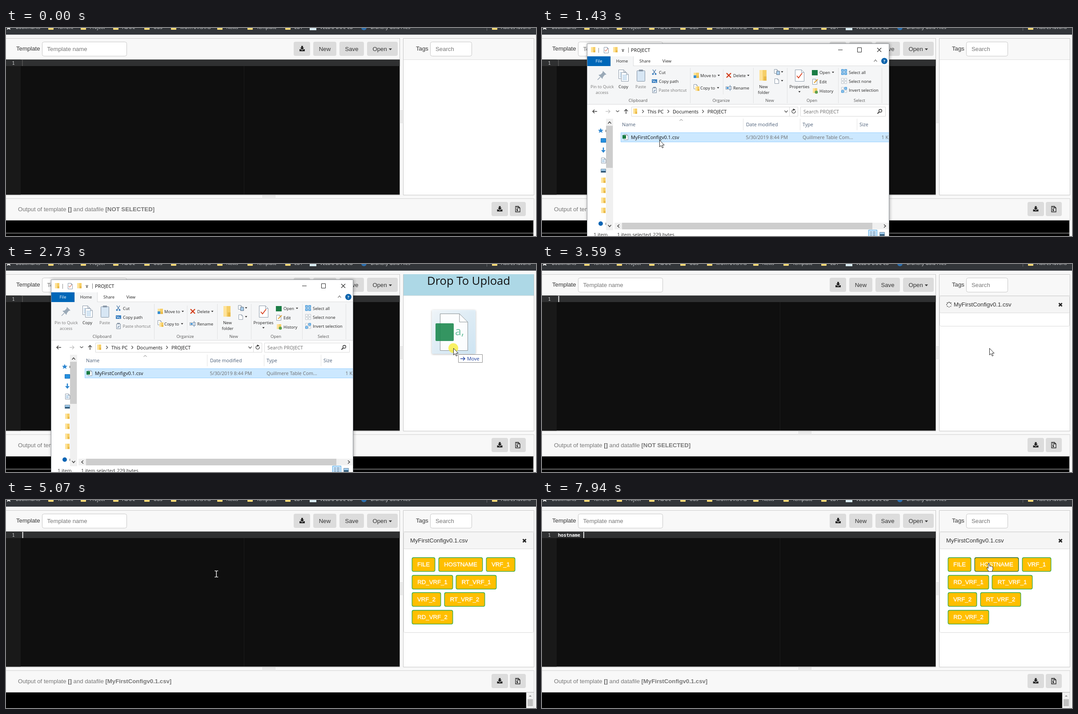
An HTML page with a canvas for the animation above (8 s loop, 1192x470 px).

```html
<!DOCTYPE html>
<html lang="en">
<head>
<meta charset="utf-8">
<title>Template editor</title>
<style>
html, body { margin: 0; width: 100%; height: 100%; overflow: hidden; background: #f8f8f8; }
canvas { display: block; }
</style>
</head>
<body>
<canvas id="stage" width="1192" height="470"></canvas>
<script>
const LOOP = 8000;
const WEB = '13.2px "Liberation Sans", Arial, sans-serif';
const UI = '10.8px "Open Sans", sans-serif';
const RIBBON = '9.4px "Open Sans", sans-serif';
const MONO = 'bold 10.4px "Noto Sans Mono", monospace';
const FILE = 'MyFirstConfigv0.1.csv';

const stage = document.getElementById('stage').getContext('2d');
let c = stage;

// ---------- drawing helpers ----------
function box(x, y, w, h, fill, stroke, r = 0) {
  const o = stroke ? 0.5 : 0;
  c.beginPath();
  c.roundRect(x + o, y + o, w - 2 * o, h - 2 * o, r);
  if (fill) { c.fillStyle = fill; c.fill(); }
  if (stroke) { c.strokeStyle = stroke; c.lineWidth = 1; c.stroke(); }
}
function text(s, x, y, font = UI, color = '#111', align = 'left') {
  c.font = font;
  c.fillStyle = color;
  c.textAlign = align;
  c.fillText(s, x, y);
  return x + c.measureText(s).width;
}
function trace(pts, x = 0, y = 0) {
  c.beginPath();
  for (let i = 0; i < pts.length; i += 2) c.lineTo(x + pts[i], y + pts[i + 1]);
}
function line(color, width, ...pts) {
  trace(pts);
  c.strokeStyle = color;
  c.lineWidth = width;
  c.stroke();
}
function poly(color, ...pts) {
  trace(pts);
  c.fillStyle = color;
  c.fill();
}
function disc(x, y, r, color) {
  c.beginPath();
  c.arc(x, y, r, 0, 7);
  c.fillStyle = color;
  c.fill();
}
const hline = (x1, x2, y, color) => box(x1, y, x2 - x1, 1, color);
const vline = (x, y1, y2, color) => box(x, y1, 1, y2 - y1, color);
const caret = (x, y, r = 2.5, color = '#222') => poly(color, x - r, y - r / 2, x + r, y - r / 2, x, y + r / 2 + 0.5);
function chevron(x, y, dx, dy, color = '#444', width = 1.2) {
  if (dx) line(color, width, x - dx, y - 3.5, x + dx, y, x - dx, y + 3.5);
  else line(color, width, x - 3.5, y - dy, x, y + dy, x + 3.5, y - dy);
}
function folder(x, y, w = 10, h = 12) {
  box(x, y, w, h, '#f6cf68');
  box(x, y, w * 0.45, h, '#ffe39a');
  box(x + w * 0.6, y + h * 0.6, w * 0.4, h * 0.4, '#e9b949');
}
function sheet(x, y, w, h, edge = '#8a98a8') {
  const f = w * 0.3;
  trace([0, 0, w - f, 0, w, f, w, h, 0, h, 0, 0], x + 0.5, y + 0.5);
  c.fillStyle = '#fff';
  c.fill();
  c.strokeStyle = edge;
  c.lineWidth = 1;
  c.stroke();
  line(edge, 1, x + w - f + 0.5, y + 0.5, x + w - f + 0.5, y + f + 0.5, x + w + 0.5, y + f + 0.5);
}
const tick = (x, y, s) => line('#d8401f', s / 3.2, x - s, y, x - s / 3, y + s * 0.8, x + s, y - s);
const picture = (x, y) => {
  box(x, y, 12, 9, '#9cc8ea', '#7f93a5');
  box(x + 1, y + 5, 10, 3, '#2d5877');
};

// ---------- web page ----------
function download(x, y) {
  poly('#222', x - 2, y - 6, x + 2, y - 6, x + 2, y - 2, x + 4.5, y - 2, x, y + 3, x - 4.5, y - 2, x - 2, y - 2);
  poly('#222', x - 6, y + 1.5, x - 3, y + 1.5, x, y + 4.2, x + 3, y + 1.5, x + 6, y + 1.5, x + 6, y + 6, x - 6, y + 6);
}
function zipIcon(x, y) {
  line('#222', 1.3, x + 1.5, y - 6, x - 5, y - 6, x - 5, y + 6.5, x + 5, y + 6.5, x + 5, y - 2.5, x + 1.5, y - 6, x + 1.5, y - 2.5, x + 5, y - 2.5);
  for (let i = 0; i < 3; i++) box(x - 2.5 + i % 2 * 1.5, y - 5 + i * 2, 1.5, 2, '#222');
  box(x - 2.5, y + 1, 3, 3.5, '#222', null, 1);
}
function button(x, y, w, label) {
  box(x, y, w, 32, '#dcdcdc', null, 4);
  if (label) text(label, x + w / 2, y + 20.5, WEB, '#333', 'center');
}
function bookmarks() {
  box(0, 0, 1192, 15, '#323539');
  const font = '10.4px "Open Sans", sans-serif';
  const items = [[95, 'Torrent'], [168, 'Project'], [241, 'ADOC'], [311, 'OBS'], [371, 'MORTUVISTAS'],
    [475, 'News'], [543, 'Template'], [628, 'EDT'], [1093, 'Autres favoris']];
  poly('#f0f0f0', 1, -1, 11, -1, 9, 0, 10, 4, 6, 2, 2, 4, 3, 0);
  text('Bookmarks', 22, 2, font, '#e4e6e8');
  for (const [x, name] of items) {
    box(x, -6, 12, 10, '#f7d977', null, 1);
    text(name, x + 20.5, 2, font, '#e4e6e8');
  }
  box(683, -10, 15, 15, '#d8ebf2');
  text('VELDO DOC CD', 706, 2, font, '#e4e6e8');
  disc(805, -1, 6, '#2d6fae');
  text('Branchy Gold Files', 820, 2, font, '#e4e6e8');
  vline(1081, 0, 6, '#6a6d70');
}
function grip(x, y, cols, rows) {
  for (let i = 0; i < cols; i++)
    for (let j = 0; j < rows; j++) box(x + i * 3, y + j * 3, 1.5, 1.5, '#c2c2c2');
}
function tag(label, x, y, w, hot) {
  box(x - 0.4, y - 0.4, w + 0.8, 32.4, hot ? '#176b2c' : '#28a745', null, 4);
  box(x + 0.9, y + 0.9, w - 1.8, 29.8, '#ffbf00', null, 3);
  text(label, x + w / 2, y + 20.2, WEB, '#fff', 'center');
  c.strokeStyle = '#fff';
  c.lineWidth = 0.35;
  c.strokeText(label, x + w / 2, y + 20.2);
}
const TAGS = [['FILE', 913, 130, 52], ['HOSTNAME', 973, 130, 99], ['VRF_1', 1080, 130, 65],
  ['RD_VRF_1', 913, 170, 92], ['RT_VRF_1', 1012, 170, 91], ['VRF_2', 913, 209, 65],
  ['RT_VRF_2', 986, 209, 91], ['RD_VRF_2', 913, 249, 92]];
const tagAt = (x, y) => TAGS.find(b => x > b[1] && x < b[1] + b[3] && y > b[2] && y < b[2] + 32);

function fileCard(t, loaded, pointer) {
  box(894, 72, 293, loaded ? 228 : 69, '#fff', '#d9d9d9', 3);
  box(894, 72, 293, 39, '#f5f5f5', '#dadada', 3);
  text(FILE, loaded ? 909 : 926, 96, WEB, '#333');
  line('#222', 2.8, 1162.5, 88.5, 1169.5, 95.5);
  line('#222', 2.8, 1169.5, 88.5, 1162.5, 95.5);
  if (loaded) {
    const hot = tagAt(pointer.x, pointer.y);
    for (const b of TAGS) tag(...b, b === hot);
    return;
  }
  const turn = Math.floor((t - 3590) / 80);
  for (let i = 0; i < 8; i++) {
    const a = (i + turn) * Math.PI / 4;
    disc(915.5 + 5.3 * Math.cos(a), 92 + 5.3 * Math.sin(a), 0.8 + i * 0.08, '#333');
  }
}
function page(t, state) {
  box(0, 0, 1192, 470, '#f8f8f8');
  bookmarks();

  hline(0, 886, 23, '#c9c9c9');
  vline(885, 23, 72, '#c4c4c4');
  text('Template', 23, 50.5, WEB, '#333');
  box(81, 31, 191, 33, '#fff', '#c6c6c6', 4);
  text('Template name', 92.5, 52, WEB, '#777');
  button(647, 31, 37);
  download(666, 46.5);
  button(691, 31, 52, 'New');
  button(750, 31, 55, 'Save');
  button(812, 31, 69);
  text('Open', 824.5, 51.5, WEB, '#333');
  caret(864.5, 48, 3.6, '#333');

  box(0, 71.5, 885.5, 305, '#0f0f0f');
  box(0, 71.5, 33, 305, '#191919');
  box(0, 71.5, 885.5, 14.5, '#2f3031');
  vline(535, 86, 376, '#1c1c1c');
  hline(0, 886, 377, '#c4c4c4');
  text('1', 13.5, 82.5, '10.4px "Noto Sans Mono", monospace', '#d8d8d8');
  text(state.typed, 36, 82.5, MONO, '#fff');
  const cx = 36.7 + 6.25 * state.typed.length;
  if (t < 3590) box(36, 72, 2, 14, '#4c4c4c');
  else if (state.blink) box(cx, 72, 1.8, 14, '#fff');
  grip(887, 186, 2, 10);
  grip(577, 378.5, 10, 2);

  box(893, 23, 295, 355, '#fff', '#c4c4c4');
  box(894, 24, 293, 47, '#f8f8f8');
  hline(894, 1187, 71, '#dedede');
  text('Tags', 922, 50.5, WEB, '#333');
  box(954, 31, 94, 33, '#fff', '#c6c6c6', 4);
  text('Search', 966, 52, WEB, '#777');
  if (state.over) {
    box(894, 23, 293, 48, '#add8e6');
    text('Drop To Upload', 1040.5, 46.5, '25.6px "Open Sans", sans-serif', '#111', 'center');
  }
  if (t >= 3590) fileCard(t, state.loaded, state.pointer);

  hline(0, 1188, 385, '#d2d2d2');
  vline(1187, 385, 470, '#d2d2d2');
  const bold = 'bold ' + WEB;
  let x = text('Output of template ', 27, 414, WEB, '#777');
  x = text('[]', x, 414, bold, '#666');
  x = text(' and datafile ', x, 414, WEB, '#777');
  text(`[${state.loaded ? FILE : 'NOT SELECTED'}]`, x, 414, bold, '#777');
  button(1092, 393, 37);
  download(1110.5, 408.5);
  button(1133, 393, 36);
  zipIcon(1151, 409);
  hline(0, 1187, 434, '#b4b4b4');
  box(0, 435, 1186, 35, '#000');
  if (state.loaded) {
    box(1170, 435, 17, 35, '#f1f1f1');
    caret(1179, 442.5, -3.2, '#777');
    box(1173, 450, 12, 16, '#c1c1c1');
  } else {
    hline(0, 1186, 463, '#c8c8c8');
  }
}

// ---------- file explorer ----------
function ribbon() {
  const GRAY = '#777';
  const label = (s, x, y, color, align) => text(s, x, y, RIBBON, color || '#222', align);
  const mid = (s, x, y, color) => label(s, x, y, color, 'center');
  box(102, 86, 679, 86, '#f5f6f7');
  box(102, 64, 52, 22, '#0067b8');
  box(154, 64, 52, 23, '#f5f6f7');
  vline(154, 64, 86, '#dadbdc');
  vline(205, 64, 86, '#dadbdc');
  hline(206, 781, 85, '#dadbdc');
  hline(102, 781, 172, '#dadbdc');
  mid('File', 128, 78, '#fff');
  mid('Home', 180, 78);
  mid('Share', 231.5, 78);
  mid('View', 281, 78);
  chevron(750, 74, 0, -2.2, '#777');
  disc(770, 74.5, 7, '#0a64ad');
  text('?', 770, 78, 'bold 9px "Open Sans", sans-serif', '#fff', 'center');
  for (const x of [333, 475, 551, 666, 764]) vline(x, 90, 170, '#e0e1e2');
  vline(407, 94, 150, '#e3e4e5');
  [['Clipboard', 216], ['Organize', 403], ['New', 512], ['Open', 607], ['Select', 714]]
    .forEach(([s, x]) => mid(s, x, 167, '#555'));

  poly('#9aa9b7', 137, 97, 145, 105, 141, 106, 137, 111, 136, 115, 127, 106, 132, 105, 136, 101);
  line('#9aa9b7', 1.6, 131, 111, 125, 117);
  mid('Pin to Quick', 135.5, 135.5, GRAY);
  mid('access', 135, 148.5, GRAY);
  for (const d of [0, 6]) {
    sheet(172 + d, 94 + d, 16, 20);
    for (let i = 0; i < 5; i++) hline(175 + d, 185 + d, 100 + d + i * 2.6, '#8fbbe0');
  }
  mid('Copy', 183, 135.5);
  box(213, 96, 19, 25, '#d7e6f4', '#7f8fa0', 1);
  box(218, 94, 9, 4, '#8a98a8');
  mid('Paste', 222, 135.5, GRAY);
  line('#3a6ea5', 1.3, 249, 94, 255, 103);
  line('#3a6ea5', 1.3, 256, 94, 250, 103);
  disc(249.5, 104, 2, '#3a7fc0');
  disc(255.5, 104, 2, '#3a7fc0');
  label('Cut', 263, 103.5);
  box(247, 116, 12, 8, '#3a7fc0');
  line('#fff', 1, 249, 118, 251, 122, 253, 119, 255, 122, 257, 122);
  label('Copy path', 263, 123.5);
  box(248, 135, 10, 12, '#e8eef4', '#7f8fa0');
  box(250, 133, 6, 3, '#8a98a8');
  line('#6580a0', 1.3, 251, 144, 255, 140);
  label('Paste shortcut', 262.5, 143.5, GRAY);

  folder(341, 101, 12, 12);
  box(341, 107, 6, 6, '#3a8fd0');
  label('Move to', 356, 111);
  caret(397.5, 107);
  sheet(341, 127, 8, 10);
  folder(345, 132, 9, 10);
  label('Copy to', 356, 139);
  caret(396, 135);
  line('#d13a15', 2.4, 415, 102, 425, 112);
  line('#d13a15', 2.4, 425, 102, 415, 112);
  label('Delete', 430, 111);
  caret(464, 107);
  box(413, 132, 14, 7, '#fff', '#7f8fa0');
  box(415, 134, 5, 3, '#2d86d0');
  line('#3a6ea5', 1, 423, 129, 423, 142);
  label('Rename', 430, 139);

  folder(489, 95, 16, 24);
  mid('New', 498, 135.5);
  mid('folder', 498.5, 148.5);
  sheet(522, 93, 8, 9);
  box(527, 97, 8, 9, '#a9cdea', '#667788');
  caret(540, 99);
  sheet(523, 114, 9, 11);
  caret(540, 119);

  sheet(569, 94, 20, 26);
  tick(579, 108, 6);
  mid('Properties', 579, 135.5);
  caret(579, 144);
  box(607, 95, 13, 12, '#1b7d45');
  label('Open', 624, 104);
  caret(654.5, 100);
  sheet(608, 115, 10, 12);
  line('#e0a030', 2, 612, 124, 620, 116);
  label('Edit', 624, 124.5);
  folder(609, 136, 10, 11);
  disc(617, 145, 3.5, '#5ea04d');
  label('History', 624, 145.5);

  ['Select all', 'Select none', 'Invert selection'].forEach((s, i) => {
    for (let k = 0; k < 4; k++) {
      const on = i === 0 || (i === 2 && (k === 1 || k === 2));
      box(673 + k % 2 * 7, 93 + i * 20.2 + (k >> 1) * 7, 6, 6, on ? '#8cc3ee' : '#fff', on ? '#3a8fd0' : '#b8c0c8');
    }
    label(s, 690, 103.5 + i * 20);
  });
}
function titleBar() {
  folder(110, 43);
  vline(127, 45, 56, '#888');
  sheet(139, 43, 10, 13);
  tick(144.5, 50, 3.2);
  folder(160, 43);
  hline(179, 185, 48, '#333');
  caret(182, 52);
  vline(194, 44, 56, '#777');
  text('PROJECT', 200, 54);
  hline(666, 676, 49, '#222');
  box(709, 44, 10, 11, null, '#222');
  line('#222', 1.1, 754, 45, 763, 54);
  line('#222', 1.1, 763, 45, 754, 54);
}
function arrow(x, y, dx, dy, color) {
  line(color, 1.4, x - 5 * dx, y - 5 * dy, x + 5 * dx, y + 5 * dy);
  line(color, 1.4, x + dx - 4 * dy, y + dy - 4 * dx, x + 5 * dx, y + 5 * dy, x + dx + 4 * dy, y + dy + 4 * dx);
}
function addressBar() {
  arrow(119, 188.5, -1, 0, '#333');
  arrow(148, 188.5, 1, 0, '#c0c0c0');
  chevron(170, 188, 0, 1.5);
  arrow(189, 189, 0, -1, '#333');
  box(201, 178, 375, 22, '#fff', '#d9d9d9');
  folder(205, 182, 9, 12);
  [[227, 'This PC'], [284, 'Documents'], [362, 'PROJECT']].forEach(([x, s]) => {
    chevron(x, 188.5, 1.6, 0);
    text(s, x + 10, 192.5);
  });
  chevron(549, 188.5, 0, 2);
  vline(556, 178, 199, '#d9d9d9');
  c.beginPath();
  c.arc(566, 188.5, 4, -0.4, 4.8);
  c.strokeStyle = '#333';
  c.stroke();
  poly('#333', 565, 182, 570, 184.5, 565, 187);
  box(581, 178, 192, 22, '#fff', '#d9d9d9');
  text('Search PROJECT', 588, 192.5, UI, '#6d6d6d');
  c.beginPath();
  c.arc(761, 187, 3.3, 0, 7);
  c.lineWidth = 1.4;
  c.strokeStyle = '#333';
  c.stroke();
  line('#333', 2, 758.5, 189.5, 754.5, 193.5);
}
function navPane() {
  poly('#2d86d0', 132, 226, 133.8, 230, 138, 230.3, 134.8, 233, 136, 237, 132, 234.8, 128, 237, 129.2, 233, 126, 230.3, 130.2, 230);
  vline(143, 230, 235, '#444');
  box(132, 249, 12, 10, '#2490df', '#1a6fb5');
  line('#2d86d0', 2.6, 138, 270, 138, 277);
  poly('#2d86d0', 133, 276, 143, 276, 138, 282);
  sheet(133, 293, 10, 12);
  for (let i = 0; i < 3; i++) hline(135, 141, 297 + i * 2.5, '#6fa5d0');
  picture(132, 318);
  for (let i = 0; i < 4; i++) folder(133, 338 + i * 22.7);
  disc(132, 442, 5, '#0a64b4');
  vline(143, 440, 445, '#555');
  box(144, 205, 16, 252, '#f0f0f0');
  box(144, 221, 15, 95, '#cdcdcd');
  chevron(152, 214, 0, -2, '#444', 1.6);
  chevron(152, 447, 0, 2, '#444', 1.6);
}
function fileList() {
  const HEAD = '#4c5f78';
  chevron(313, 208, 0, -1.5, '#777', 1);
  [[180, 'Name'], [459, 'Date modified'], [586, 'Type'], [714, 'Size']].forEach(([x, s]) => text(s, x, 222, UI, HEAD));
  for (const x of [452, 580, 708]) vline(x, 205, 231, '#e2e2e2');
  box(177, 236, 606, 22, '#cce8ff', '#99d1ff');
  sheet(184, 240, 9, 12);
  box(181, 242, 8, 8, '#1b7d45');
  text(FILE, 200, 251);
  text('5/30/2019 8:44 PM', 458.5, 251, UI, '#6d6d6d');
  text('Quillmere Table Com...', 586, 251, UI, '#6d6d6d');
  text('1 KB', 763.5, 251, UI, '#6d6d6d');
  box(163, 440, 618, 15, '#f0f0f0');
  box(180, 440, 563, 15, '#cdcdcd');
  chevron(172, 447.5, -2, 0, '#444', 1.6);
  chevron(771, 447.5, 2, 0, '#444', 1.6);
  text('1 item', 116, 471, UI, '#333');
  text('1 item selected', 169, 471, UI, '#333');
  text('229 bytes', 249.5, 471, UI, '#333');
  box(734, 456, 20, 20, '#cce8ff', '#4aa3df');
  for (let i = 0; i < 4; i++) {
    hline(738, 742, 460 + i * 3, '#57748c');
    hline(744, 750, 460 + i * 3, '#57748c');
  }
  picture(759, 461);
}
function makeExplorer() {
  const layer = document.createElement('canvas');
  layer.width = 1192;
  layer.height = 470;
  c = layer.getContext('2d');
  c.shadowColor = 'rgba(0,0,0,.35)';
  c.shadowBlur = 7;
  c.shadowOffsetX = 1;
  box(101, 35, 680, 500, '#fff');
  c.shadowColor = 'transparent';
  c.save();
  c.beginPath();
  c.rect(101, 35, 680, 500);
  c.clip();
  titleBar();
  ribbon();
  addressBar();
  navPane();
  fileList();
  box(101, 35, 680, 500, null, '#8f9499');
  c.restore();
  c = stage;
  return layer;
}
function showExplorer(layer, t) {
  const k = t < 580 ? 1 : t < 660 ? 0.3 : 0;
  const s = 1 - 0.034 * k;
  c.save();
  c.globalAlpha = 1 - 0.28 * k;
  c.translate(101 + 6 * k, 35 + 32 * k);
  c.scale(s, s);
  c.drawImage(layer, -101, -35);
  c.restore();
}

// ---------- pointer ----------
const inEditor = (x, y) => x < 885 && y > 72 && y < 376;

function shape(pts, x, y) {
  trace(pts, x, y);
  c.closePath();
  c.fillStyle = '#fff';
  c.fill();
  c.strokeStyle = '#222';
  c.lineWidth = 1;
  c.stroke();
}
function drawPointer({ x, y }, loaded) {
  if (loaded && tagAt(x, y)) {
    shape([-1.5, 0, 1, 0, 1.5, 6, 4, 6, 6.5, 7, 9, 8, 9, 13, 7, 18, 0, 18, -5, 11, -4, 9.5, -1.5, 11], x, y);
  } else if (loaded && inEditor(x, y)) {
    line('#fff', 1.4, x, y - 7, x, y + 7);
    for (const d of [-7, 7]) line('#fff', 1.3, x - 4, y + d, x - 1, y + d, x, y + d * 0.85, x + 1, y + d, x + 4, y + d);
  } else {
    shape([0, 0, 0, 15, 3.5, 12, 6, 17.5, 8.3, 16.5, 6, 11.2, 10.5, 11], x + 0.5, y + 0.5);
  }
}
function dragImage(x, y) {
  c.save();
  c.globalAlpha = 0.9;
  c.translate(x - 48, y - 86);
  const tint = c.createLinearGradient(0, 0, 99, 99);
  tint.addColorStop(0, '#f4fafe');
  tint.addColorStop(1, '#cfe8f8');
  c.shadowColor = 'rgba(0,0,0,.3)';
  c.shadowBlur = 4;
  c.shadowOffsetY = 1;
  box(0, 0, 98, 99, tint, null, 2);
  c.shadowColor = 'transparent';
  sheet(18, 8, 62, 83, '#7d8488');
  box(8, 30, 41, 40, '#1f8a50', null, 2);
  text('a,', 52, 57, '25px "Open Sans", sans-serif', '#5db896');
  c.restore();
}
function moveLabel(x, y) {
  box(x + 11, y + 14, 55, 19, '#fff', '#8a8a8a');
  arrow(x + 21, y + 24, 1, 0, '#1a3c9c');
  text('Move', x + 31, y + 28, UI, '#1a3c9c');
}

// Each leg: first and last change, number of steps, evenly timed waypoints.
const LEGS = [
  [890, 1120, 4, [[330, 530], [316, 456], [303, 375], [291, 308], [286, 283]]],
  [1270, 1880, 9, [[286, 283], [264, 253], [253, 244], [249, 241]]],
  [2030, 2730, 10, [[249, 241], [285, 236], [430, 225], [680, 208], [900, 195], [985, 191], [1006, 190]]],
  [4370, 5150, 11, [[1006, 190], [1003, 213], [960, 225], [830, 214], [650, 190], [480, 173], [465, 160]]],
  [7320, 7940, 9, [[465, 160], [560, 168], [770, 181], [930, 184], [995, 158], [1005, 143.5]]]
];
function pointerAt(t) {
  let leg = null;
  for (const l of LEGS) if (t >= l[0]) leg = l;
  if (!leg) return null;
  const [from, to, steps, pts] = leg;
  const step = Math.floor((t - from) / (to - from) * (steps - 1) + 0.05) + 1;
  const u = Math.min(1, step / steps) * (pts.length - 1);
  const i = Math.min(pts.length - 2, Math.floor(u));
  const [a, b] = [pts[i], pts[i + 1]];
  return { x: a[0] + (b[0] - a[0]) * (u - i), y: a[1] + (b[1] - a[1]) * (u - i) };
}

// ---------- timeline ----------
const KEYS = [[5990, 2], [6070, 3], [6300, 4], [6370, 5], [6450, 6], [6620, 7], [6690, 8], [6920, 9]];

function render(t) {
  const pointer = pointerAt(t);
  let count = 0, focus = 3590;
  for (const [at, n] of KEYS) if (t >= at) { count = n; focus = at; }
  const dragging = t >= 2100 && t < 3590;
  const loaded = t >= 4190;
  const blink = Math.floor((t - focus) / 505) % 2 === 0;
  page(t, { pointer, loaded, blink, typed: 'hostname '.slice(0, count), over: dragging && pointer.x > 893 });
  if (t >= 500 && t < 3590) showExplorer(explorer, t);
  if (!pointer) return;
  if (dragging) dragImage(pointer.x, pointer.y);
  if (t >= 1800 && t < 3590) disc(pointer.x, pointer.y, 11, 'rgba(247,238,60,.8)');
  drawPointer(pointer, loaded);
  if (dragging) moveLabel(pointer.x, pointer.y);
}

const explorer = makeExplorer();
const start = performance.now();
function animate() {
  render((performance.now() - start) % LOOP);
  requestAnimationFrame(animate);
}
animate();
</script>
</body>
</html>
```
